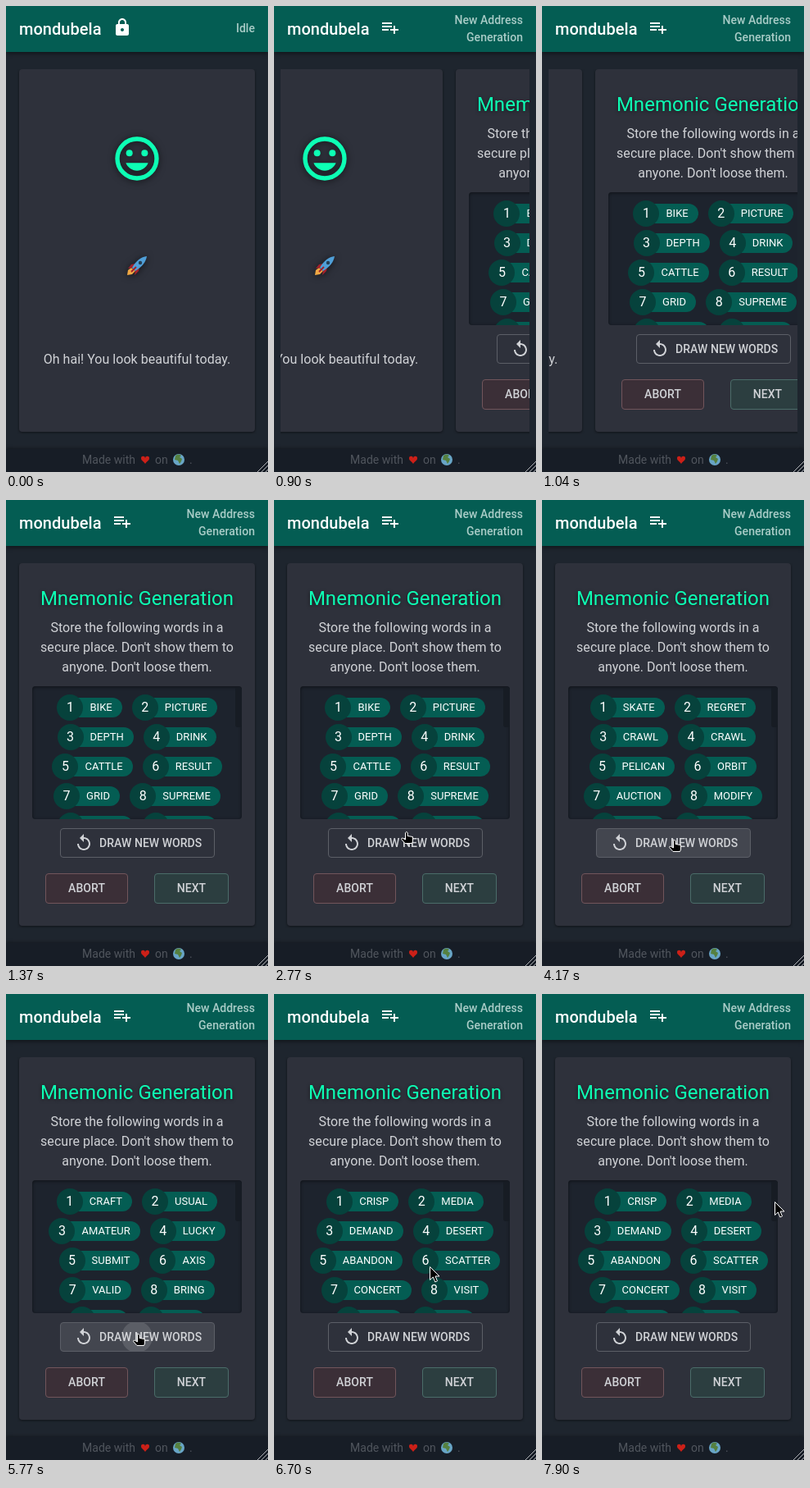
These frames come from a looping animation (320x568 px, 8 s). An HTML page:

```html
<!DOCTYPE html>
<html lang="en">
<head>
<meta charset="utf-8">
<title>Mnemonic Generation</title>
<style>
html, body { margin: 0; width: 100%; height: 100%; overflow: hidden; background: #1e252e; }
body { position: relative; font: 16px/24px Roboto, sans-serif; letter-spacing: .03px; color: #d0d2d6; }
div, svg { position: absolute; box-sizing: border-box; }
svg { overflow: visible; }
.mid { left: 0; width: 320px; text-align: center; white-space: nowrap; }
header { position: absolute; width: 320px; height: 56px; background: #045d53; box-shadow: 0 2px 5px rgba(0,0,0,.45); }
#brand { left: 16px; top: 16px; font-size: 20px; font-weight: 500; color: #fff; }
#state { right: 16px; top: 0; height: 56px; width: 90px; font: 500 14px/21.4px Roboto, sans-serif; color: #a9ccc7;
  display: flex; align-items: center; justify-content: flex-end; text-align: right; }
#view { left: 8px; top: 77px; width: 304px; height: 445px; overflow: hidden; }
.pane { left: -8px; top: -77px; width: 320px; height: 568px; }
.card { left: 16px; top: 77px; width: 288px; height: 442px; border-radius: 4px; background: #2e313b;
  box-shadow: 0 1px 3px rgba(0,0,0,.5); }
h1 { position: absolute; margin: 0; top: 104px; font: 400 24px/32px Roboto, sans-serif;
  color: #0dffb4; text-shadow: 0 1px 4px rgba(0,0,0,.5); }
.glow { filter: drop-shadow(0 1px 4px rgba(0,0,0,.6)); }
#words { left: 32px; top: 227px; width: 256px; height: 162px; overflow: hidden; border-radius: 4px;
  background: #1d232d; box-shadow: inset 0 1px 4px rgba(0,0,0,.5); }
#thumb { left: 280px; top: 228px; width: 8px; height: 49px; border-radius: 3px; background: #171c24; }
.row { left: 0; width: 256px; height: 32px; display: flex; justify-content: center; gap: 12px; }
.chip { position: relative; height: 32px; padding: 0 12px 0 40px; font-size: 13px; line-height: 32px; color: #fff; white-space: nowrap; }
.chip::before { content: ""; position: absolute; left: 8px; right: 0; top: 4px; bottom: 4px; border-radius: 12px; background: #045d53; }
.chip b { position: absolute; left: 0; top: 0; width: 32px; border-radius: 50%; background: #06423c; font-weight: 400; font-size: 16px; text-align: center; }
.chip span { position: relative; }
.btn { border: 1px solid #5c5f67; border-radius: 4px; font: 500 14px/35px Roboto, sans-serif; text-align: center; overflow: hidden; white-space: nowrap; }
#draw { left: 66px; top: 400px; width: 189px; height: 36px; line-height: 34px; text-align: left; padding-left: 47px; }
#ripple { border-radius: 50%; background: #fff; }
footer { position: absolute; top: 540px; width: 320px; height: 28px; background: #171d26; box-shadow: 0 -1px 4px rgba(0,0,0,.35);
  font-size: 14px; line-height: 26px; color: #50555d; }
</style>
</head>
<body>
<header>
  <div id="brand">mondubela</div>
  <svg style="left:130px;top:14px" width="24" height="24" fill="#fff"><path id="icon"/></svg>
  <div id="state"></div>
</header>

<div id="view">
  <div class="pane" id="idle">
    <div class="card"></div>
    <svg class="glow" style="left:128px;top:153.5px" width="64" height="64" viewBox="0 0 24 24" fill="#0dffb4">
      <circle cx="12" cy="12" r="9" fill="none" stroke="#0dffb4" stroke-width="2"/>
      <circle cx="8.5" cy="9.5" r="1.5"/><circle cx="15.5" cy="9.5" r="1.5"/>
      <path d="M12 17.5c2.33 0 4.31-1.46 5.11-3.5H6.89c.8 2.04 2.78 3.5 5.11 3.5z"/>
    </svg>
    <svg class="glow" style="left:148px;top:305px" width="24" height="24">
      <path d="M5 14L1 17 0 23 6 22 10 18z" fill="#f0a844"/>
      <path d="M10 9L5 10 1 15 7 14zM15 14L14 18 9 23 10 17z" fill="#a3202b"/>
      <path d="M24 0C17 1 11 5 6 14L10 18C18 13 23 7 24 0z" fill="#4f9fd8"/>
      <path d="M11 13L5 19" stroke="#a3202b" stroke-width="2"/>
      <circle cx="16" cy="8" r="2.2" fill="#263f55"/>
    </svg>
    <div class="mid" style="top:419px">Oh hai! You look beautiful today.</div>
  </div>

  <div class="pane" id="mnemonic">
    <div class="card"></div>
    <h1 class="mid">Mnemonic Generation</h1>
    <div class="mid" style="top:143.5px">Store the following words in a<br>secure place. Don't show them to<br>anyone. Don't loose them.</div>
    <div id="words"></div>
    <div id="thumb"></div>
    <div class="btn" id="draw">
      <svg style="left:16px;top:5px" width="24" height="24" fill="#d0d2d6"><path d="M12 5V1L7 6l5 5V7c3.31 0 6 2.69 6 6s-2.69 6-6 6-6-2.69-6-6H4c0 4.42 3.58 8 8 8s8-3.58 8-8-3.58-8-8-8z"/></svg>
      DRAW NEW WORDS
      <div id="ripple"></div>
    </div>
    <div class="btn" style="left:48px;top:455px;width:101px;height:37px;background:#3b2f37;border-color:#71555b">ABORT</div>
    <div class="btn" style="left:181px;top:455px;width:91px;height:37px;background:#2c3e40;border-color:#4b6c69">NEXT</div>
  </div>
</div>

<footer>
  <div style="left:93px">Made with</div>
  <svg style="left:165px;top:9px" width="10" height="9"><path d="M5 9C3 6 0 5 0 2.5A2.5 2.5 0 0 1 5 2 2.5 2.5 0 0 1 10 2.5C10 5 7 6 5 9z" fill="#cc2018"/></svg>
  <div style="left:182px">on</div>
  <svg style="left:204px;top:6px" width="14" height="14">
    <circle cx="7" cy="7" r="7" fill="#68a5c6"/>
    <path d="M3 2Q7-1 10 2L8 4 11 6 10 9 8 12 6 8 2 7z" fill="#55803f"/>
  </svg>
  <div style="left:224px">.</div>
  <svg style="left:306px;top:14px" width="14" height="14"><path d="M1 14L14 1M6 14L14 6M11 14L14 11" stroke="#b4b6ba"/></svg>
</footer>

<svg id="cursor" width="16" height="20" fill="#000" stroke="#fff" stroke-linejoin="round"><path id="shape"/></svg>

<script>
const $ = id => document.getElementById(id);
const LOOP = 8000, HEAD = 500, SLIDE = 849, SLIDE_TIME = 400, ENTER = 2090;
const PRESSES = [3560, 4690, 5760];

const LOCK = "M18 8h-1V6c0-2.76-2.24-5-5-5S7 3.24 7 6v2H6c-1.1 0-2 .9-2 2v10c0 1.1.9 2 2 2h12c1.1 0 2-.9 2-2V10c0-1.1-.9-2-2-2zm-6 9c-1.1 0-2-.9-2-2s.9-2 2-2 2 .9 2 2-.9 2-2 2zm3.1-9H8.9V6c0-1.71 1.39-3.1 3.1-3.1 1.71 0 3.1 1.39 3.1 3.1v2z";
const LIST = "M14 10H2v2h12v-2zm0-4H2v2h12V6zm4 8v-4h-2v4h-4v2h4v4h2v-4h4v-2h-4zM2 16h8v-2H2v2z";
const ARROW = "M.5 .5V16.5L4.3 13 6.8 19 9.5 17.8 7 12H12z";
const HAND = "M.5 1.5Q1.8-.5 3.2 1.5V5.5L9.5 6.5V12L8.5 14.5H0L-4.5 9.5Q-4.5 7.5-2.5 8.3L.5 10z";

const SETS = [
  "BIKE PICTURE DEPTH DRINK CATTLE RESULT GRID SUPREME LEARN GIANT",
  "SKATE REGRET CRAWL CRAWL PELICAN ORBIT AUCTION MODIFY FLUTE MARCH",
  "CRAFT USUAL AMATEUR LUCKY SUBMIT AXIS VALID BRING OIL FACE",
  "CRISP MEDIA DEMAND DESERT ABANDON SCATTER CONCERT VISIT BIND SKY"
].map(s => s.split(" "));

// time, x, y of the pointer tip
const PATH = [
  [2100, 280, 298], [2400, 222, 350], [2770, 160, 404], [2900, 160, 414], [6300, 160, 414],
  [6570, 174, 346], [7440, 277, 254], [7500, 279, 254], [7640, 281, 253], [7900, 284, 253]
];

const clamp = v => Math.max(0, Math.min(1, v));
const ramp = (t, a, b) => clamp((t - a) / (b - a));

// cubic-bezier(.15, .3, .25, 1)
function ease(p) {
  const curve = (u, a, b) => 3 * (1 - u) ** 2 * u * a + 3 * (1 - u) * u * u * b + u ** 3;
  let lo = 0, hi = 1;
  for (let i = 0; i < 20; i++) {
    const u = (lo + hi) / 2;
    if (curve(u, .15, .25) < p) lo = u; else hi = u;
  }
  return curve(hi, .3, 1);
}

function pointer(t) {
  let i = 1;
  while (i < PATH.length - 1 && PATH[i][0] < t) i++;
  const [t0, x0, y0] = PATH[i - 1], [t1, x1, y1] = PATH[i], k = ramp(t, t0, t1);
  return [x0 + (x1 - x0) * k, y0 + (y1 - y0) * k];
}

let shown = -1;
function showWords(n) {
  if (n === shown) return;
  shown = n;
  const chips = SETS[n].map((w, i) => `<div class="chip"><b>${i + 1}</b><span>${w}</span></div>`);
  let html = "";
  for (let r = 0; r < 5; r++)
    html += `<div class="row" style="top:${10 + 36 * r}px">${chips[2 * r]}${chips[2 * r + 1]}</div>`;
  $("words").innerHTML = html;
}

function drawRipple(t) {
  const age = t - (PRESSES.filter(p => p <= t).pop() ?? -LOOP);
  const r = 16 + 82 * clamp(age / 300), s = $("ripple").style;
  s.left = 93 - r + "px";
  s.top = 17 - r + "px";
  s.width = s.height = 2 * r + "px";
  s.opacity = .13 * (1 - ramp(age, 75, 500));
}

let busy = null;
function drawHeader(now) {
  if (now === busy) return;
  busy = now;
  $("icon").setAttribute("d", busy ? LIST : LOCK);
  $("state").textContent = busy ? "New Address Generation" : "Idle";
}

function draw(t) {
  drawHeader(t >= HEAD);
  const shift = Math.round(304 * ease(ramp(t, SLIDE, SLIDE + SLIDE_TIME)));
  $("idle").style.transform = `translateX(${-shift}px)`;
  $("mnemonic").style.transform = `translateX(${304 - shift}px)`;
  showWords(PRESSES.filter(p => t >= p + 70).length);
  drawRipple(t);
  const hover = ramp(t, 2770, 2900) - ramp(t, 6340, 6500);
  $("draw").style.background = `rgba(255,255,255,${.1 * hover})`;

  const [x, y] = pointer(t);
  $("shape").setAttribute("d", y >= 400 ? HAND : ARROW);
  $("cursor").style.transform = `translate(${Math.round(x)}px,${Math.round(y)}px)`;
  $("cursor").style.visibility = t >= ENTER ? "visible" : "hidden";
}

const start = performance.now();
function tick() {
  draw((performance.now() - start) % LOOP);
  requestAnimationFrame(tick);
}
tick();
</script>
</body>
</html>
```
